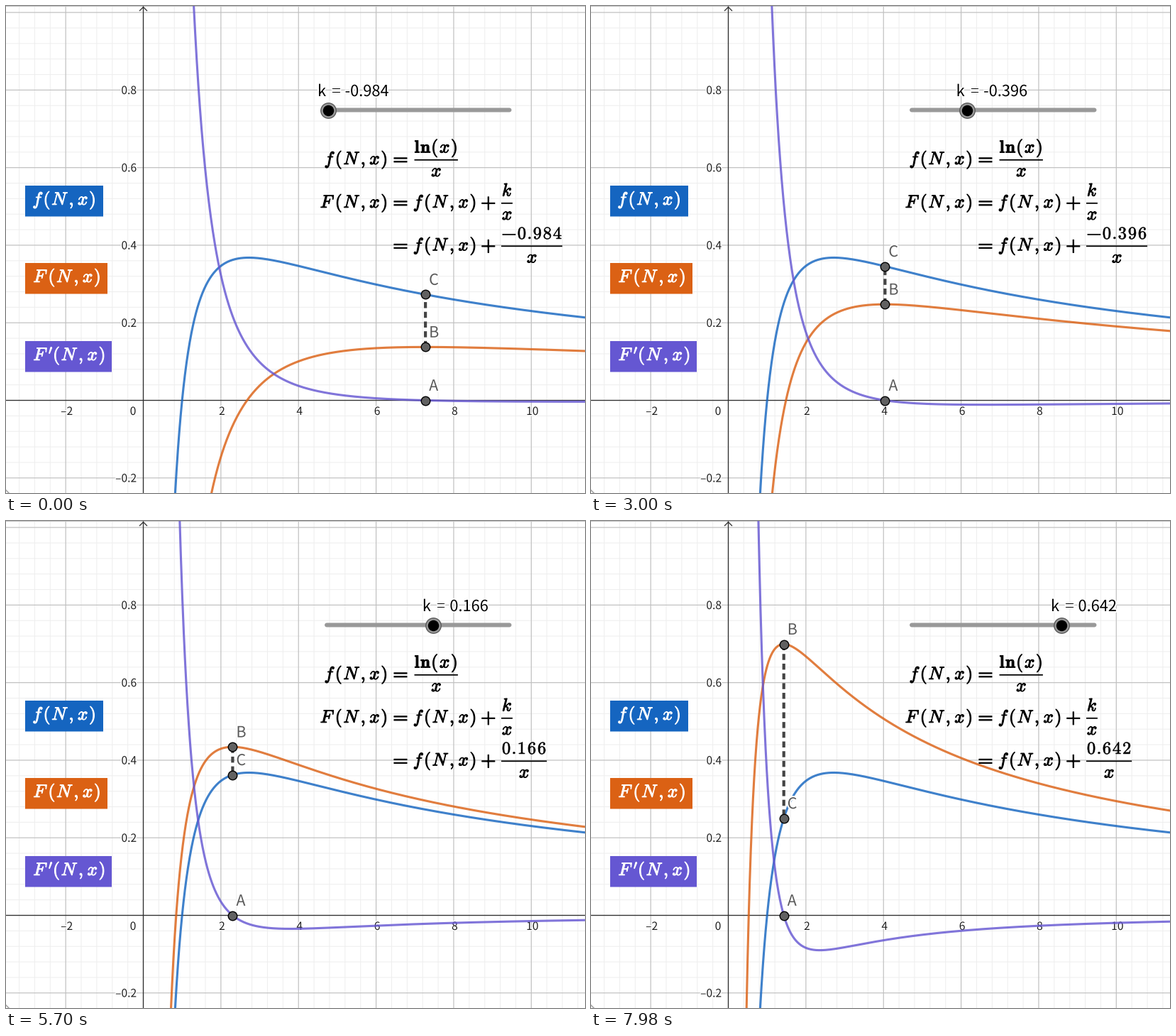
A matplotlib script for the animation above (8000 ms loop, 816 px wide and 686 px high).

```python
import numpy as np
import matplotlib.pyplot as plt
from matplotlib.animation import FuncAnimation
from matplotlib.patches import PathPatch, Rectangle
from matplotlib.path import Path
from matplotlib.patheffects import withStroke
from matplotlib.textpath import TextPath

W, H, DPI = 816, 686, 64
PT = 72 / DPI                       # points per pixel
X0, Y0, UX, UY = 193.5, 555.5, 54.68, 546.4
EM = 24.5
BLUE, ORANGE, PURPLE = "#1565c0", "#db6114", "#6557d2"

plt.rcParams["mathtext.fontset"] = "cm"
plt.rcParams["font.family"] = "Noto Sans CJK JP"

fig = plt.figure(figsize=(W / DPI, H / DPI), dpi=DPI, facecolor="white")
ax = fig.add_axes([0, 0, 1, 1])
ax.set_xlim(0, W)
ax.set_ylim(H, 0)
ax.axis("off")


def px(x):
    return X0 + UX * x


def py(y):
    return Y0 - UY * y


def line(xs, ys, color, width, z, **kw):
    return ax.plot(xs, ys, color=color, lw=width * PT, zorder=z, snap=False, **kw)[0]


def label(x, y, s, size, color, z, halo=4, **kw):
    return ax.text(x, y, s, fontsize=size * PT, color=color, zorder=z,
                   va="baseline",
                   path_effects=[withStroke(linewidth=halo * PT, foreground="white")], **kw)


# ---- bold math typesetting: advance widths in em ----
ADVANCE = {"f": .62, "F": .9, "N": 1.01, "x": .65, "k": .6, "(": .447, ")": .447,
           ",": .319, " ": .167, "=": 1.45, "+": 1.338, "-": .894, "'": .27,
           ".": .319, "l": .32, "n": .64}
ADVANCE.update({d: .575 for d in "0123456789"})
glyphs = {}


def bar(x0, x1, y0, y1):
    return Path([(x0, y0), (x1, y0), (x1, y1), (x0, y1), (x0, y0)],
                [1, 2, 2, 2, 79])


def glyph(c):
    """Path of one character in em units, centred on x = 0."""
    if c in glyphs:
        return glyphs[c]
    t = .026
    if c in "=+-":
        rows = (.15, .35) if c == "=" else (.25,)
        parts = [bar(-.37, .37, r - t, r + t) for r in rows]
        if c == "+":
            parts.append(bar(-t, t, -.12, .62))
        v = np.vstack([p.vertices for p in parts])
        codes = np.hstack([p.codes for p in parts])
    else:
        if c == "'":
            p = TextPath((0, 0), r"$\prime$", size=70)
        elif c.isdigit() or c in "ln.":
            p = TextPath((0, 0), r"$\mathbf{%s}$" % c, size=100)
        else:
            p = TextPath((0, 0), "$%s$" % c, size=103)
        v, codes = p.vertices / 100, p.codes
        box = p.get_extents()
        v = v - [(box.x0 + box.x1) / 200, -.36 if c == "'" else 0]
    glyphs[c] = v, codes
    return glyphs[c]


def width(s):
    return EM * sum(ADVANCE[c] for c in s)


def row_path(s, x, y):
    verts, codes = [], []
    for c in s:
        adv = ADVANCE[c] * EM
        if c != " ":
            v, k = glyph(c)
            verts.append(v * [EM, -EM] + [x + adv / 2, y])
            codes.append(k)
        x += adv
    return Path(np.vstack(verts), np.hstack(codes))


def row(s, x, y, color="black", bold=1.0):
    return ax.add_patch(PathPatch(row_path(s, x, y), fc=color, ec=color,
                                  lw=bold * PT, joinstyle="round", zorder=8))


def fraction(num, den, x, y):
    w = max(width(num), width(den))
    row(num, x + (w - width(num)) / 2, y - 16.4)
    row(den, x + (w - width(den)) / 2, y + 17)
    line([x, x + w], [y - 6.2] * 2, "black", 1.8, 8, solid_capstyle="butt")


# ---- grid and axes ----
for i in range(-8, 58):
    major = i % 5 == 0
    color, wid, z = ("#c0c0c0", 1.2, 1) if major else ("#eeeeee", 1, 0)
    gx = px(i * .4)
    if 0 < gx < W:
        line([gx, gx], [0, H], color, wid, z)
    gy = py(i * .04)
    if 0 < gy < H:
        line([0, W], [gy, gy], color, wid, z)
line([0, W], [.5, .5], "#c4c4c4", 1, 1)
line([0, 4], [682, 686], "#a0a0a0", 1.5, 1)
line([0, W], [Y0, Y0], "#303030", 1.3, 2)
line([X0, X0], [1, H], "#303030", 1.3, 2)
line([X0 - 5, X0, X0 + 5], [6.5, 1.5, 6.5], "#303030", 1.3, 2)

for n in range(-2, 11, 2):
    s = str(n).replace("-", "–")
    label(px(n) + (1.5 if n else -14.5), 576, s, 15.6, "#202020", 3, 3, ha="center")
for n in (-.2, .2, .4, .6, .8):
    s = f"{n:.1f}".replace("-", "–")
    label(184, py(n) + 5.7, s, 15.6, "#202020", 3, 3, ha="right")

# ---- legend and formulas ----
for s, y, w, color in (("f(N, x)", 253, 110, BLUE),
                       ("F(N, x)", 362, 116, ORANGE),
                       ("F'(N, x)", 472, 122, PURPLE)):
    ax.add_patch(Rectangle((27, y), w, 43.5, fc=color, lw=0, zorder=7, snap=False))
    row(s, 37.3, y + 27, "white")

EQ = 538.2                          # left edge of the aligned "=" signs
NULL = 1.8                          # small space before a fraction
RHS = EQ + width("=")
FRAC = RHS + width("f(N, x)+") + NULL
row("f(N, x)=", EQ - width("f(N, x)"), 223)
fraction("ln(x)", "x", RHS + NULL, 223)
row("F(N, x)=f(N, x)+", EQ - width("F(N, x)"), 284)
fraction("k", "x", FRAC, 284)
row("=f(N, x)+", EQ, 344.5)
value = row("0", FRAC, 328, bold=.6)
value_bar = line([], [], "black", 1.8, 8, solid_capstyle="butt")
value_den = row("x", FRAC, 361.5)

# ---- slider ----
line([452, 709.5], [146.5] * 2, "#999999", 6, 5, solid_capstyle="round")
knob = line([], [], "#999999", 0, 9, marker="o", ms=21.5 * PT, mec="#555555", mew=1.3 * PT)
core = line([], [], "black", 0, 9, marker="o", ms=15.5 * PT, mew=0)
k_parts = [label(0, 127, s, 21.8, "black", 9) for s in ("k", "=", "")]

# ---- curves and points ----
xs = np.geomspace(.3, 11.6, 500)


def f(x):
    return np.log(x) / x


line(px(xs), py(f(xs)), BLUE, 3.1, 4, alpha=.82)
big = line([], [], ORANGE, 3.1, 4, alpha=.82)
slope = line([], [], PURPLE, 3.1, 4, alpha=.82)
gap = line([], [], "#444444", 4.2, 5, dashes=(8.5 / 4.2, 5.2 / 4.2), dash_capstyle="butt")
dots = line([], [], "#616161", 0, 7, marker="o", ms=12.5 * PT, mec="black", mew=1.4 * PT)
names = [label(0, 0, s, 21.5, "#5a5a5a", 6) for s in "ABC"]

TIMES = [60, 1440, 3000, 4200, 5700, 6660, 7980]
VALUES = [-.984, -.72, -.396, -.144, .166, .37, .642]
STALLS = (1, 30, 129)               # ticks where the slider pauses
TICK, INTERVAL, FRAMES = 60, 40, 200


def k_at(frame):
    tick = int((frame * INTERVAL + INTERVAL / 2) // TICK)
    if tick in STALLS:
        tick -= 1
    return round(np.interp(tick * TICK, TIMES, VALUES) / .002) * .002


def update(frame):
    k = k_at(frame)
    s = f"{k:.3f}".rstrip("0").rstrip(".")
    if s == "-0":
        s = "0"

    kx = 580.5 + 128.5 * k
    knob.set_data([kx], [146.5])
    core.set_data([kx], [146.5])
    for part, dx in zip(k_parts, (-15, 5.3, 23.5)):
        part.set_x(kx + dx)
    k_parts[2].set_text(s)

    w = width(s)
    value.set_path(row_path(s, FRAC, 328))
    value_bar.set_data([FRAC, FRAC + w], [338.3] * 2)
    value_den.set_path(row_path("x", FRAC + (w - width("x")) / 2, 361.5))

    big.set_data(px(xs), py(f(xs) + k / xs))
    slope.set_data(px(xs), py((1 - np.log(xs) - k) / xs ** 2))

    top = np.exp(1 - k)             # where the slope is zero
    x = px(top)
    ys = [Y0, py(1 / top), py(f(top))]
    dots.set_data([x] * 3, ys)
    gap.set_data([x, x], [ys[1], ys[2]])
    for name, y in zip(names, ys):
        name.set_position((x + 5, y - 13.6))
    return big, slope, gap, dots, knob, core, value, value_bar, value_den, *k_parts, *names


anim = FuncAnimation(fig, update, frames=FRAMES, interval=INTERVAL,
                     repeat=True, repeat_delay=0, blit=False)
plt.show()
```
